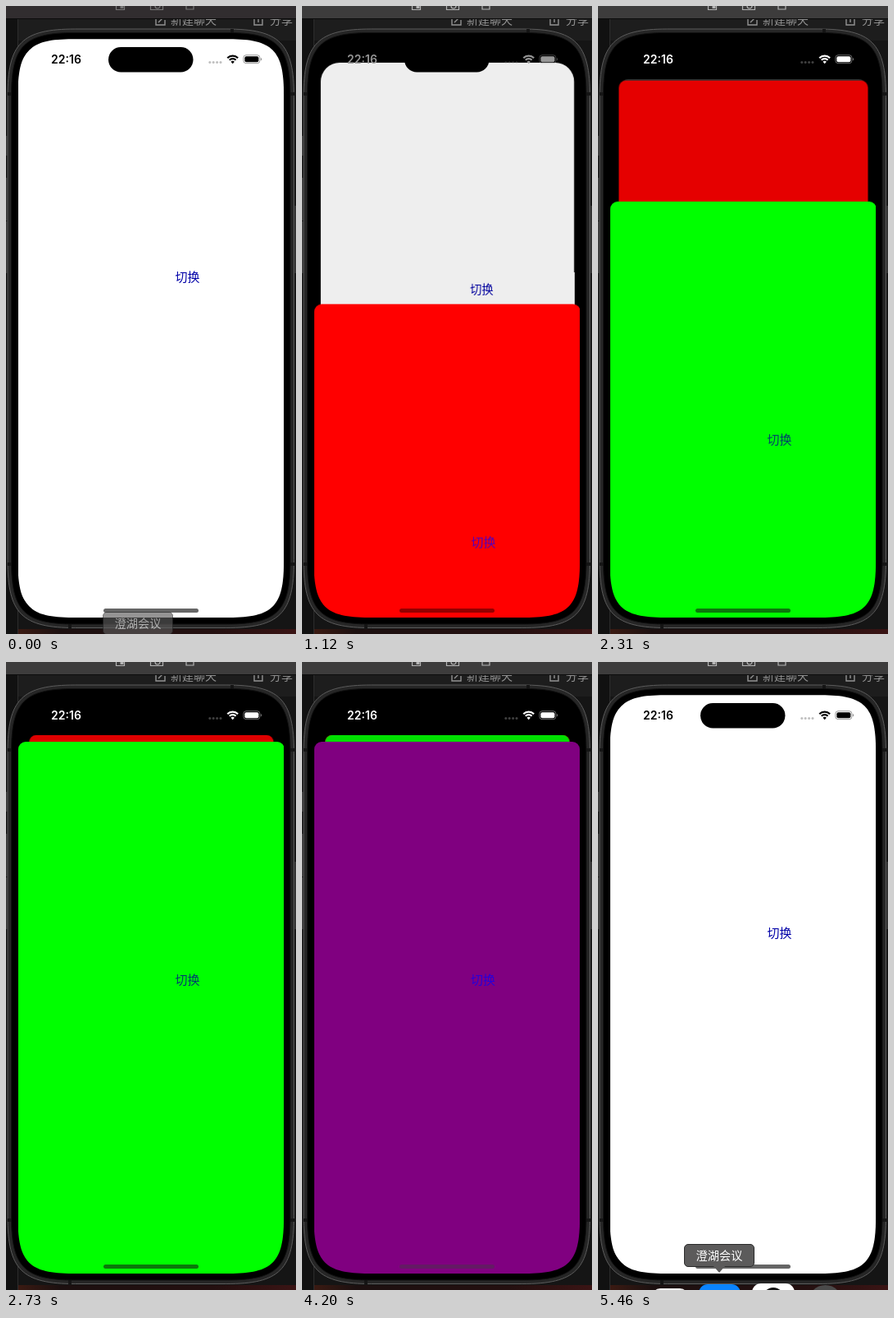
An HTML page that plays this animation: 354x764 px, repeating every 5.53 s.

```html
<!DOCTYPE html>
<html lang="zh-CN">
<head>
<meta charset="utf-8">
<title>Sheet stack</title>
<style>
:root { --loop: 5530ms; --sheet: cubic-bezier(.32, .72, 0, 1); }
html, body { margin: 0; width: 100%; height: 100%; overflow: hidden; background: #151515; }
body { font-family: "Noto Sans CJK SC", "Noto Sans CJK", sans-serif; }
#stage { position: relative; width: 354px; height: 764px; overflow: hidden; background: #151515; }
#stage > * { position: absolute; }
#stage > svg { left: 0; top: 0; }

/* window toolbar */
.bar { left: 0; top: 0; width: 354px; height: 16px; background: #312d2f; color: #777;
  border-bottom: 1px solid #0c0c0c; box-sizing: border-box; animation: focus var(--loop) step-end infinite; }
.bar svg { display: block; }
@keyframes focus {
  0% { background: #312d2f; color: #777; }
  16.456%, 100% { background: #3d3c3c; color: #b4b4b4; }
}

/* phone screen */
#screen { left: 14.5px; top: 40.3px; width: 324.6px; height: 703.7px; background: #000; }
.card { position: absolute; left: 0; top: 56.7px; width: 100%; height: 703.7px; border-radius: 9px;
  transform-origin: 50% 0; animation: var(--loop) var(--sheet) infinite; }
.card span { position: absolute; left: 156.5px; top: 279px; width: 100px; text-align: center;
  font-size: 15px; line-height: 20px; }
.base { top: 0; background: #fff; color: #0000a8; animation-name: base; }
.red { background: #f00; color: #5000c0; animation-name: red; }
.green { background: #0f0; color: #003c6e; animation-name: green; }
.purple { background: #800080; color: #2800d8; animation-name: purple; }
@keyframes base {
  0%, 18.626% { transform: none; border-radius: 46px; filter: brightness(1); opacity: 1; }
  27.667%, 39.512% { transform: translateY(49px) scale(.918); border-radius: 9px; filter: brightness(.89); opacity: 1; }
  48.553%, 76.4% { transform: translateY(49px) scale(.918); border-radius: 9px; filter: brightness(.89); opacity: 0; }
  76.401% { transform: translateY(49px) scale(.918); border-radius: 9px; filter: brightness(.89); opacity: 1; }
  85.443%, 100% { transform: none; border-radius: 46px; filter: brightness(1); opacity: 1; }
}
@keyframes red {
  0%, 18.626% { transform: translateY(648px) scale(1); filter: brightness(1); }
  27.667%, 39.512% { transform: translateY(0) scale(1); filter: brightness(1); }
  48.553%, 76.4% { transform: translateY(-8px) scale(.918); filter: brightness(.87); }
  76.401%, 100% { transform: translateY(648px) scale(1); filter: brightness(1); }
}
@keyframes green {
  0%, 39.512% { transform: translateY(648px) scale(1); filter: brightness(1); }
  48.553%, 57.016% { transform: translateY(0) scale(1); filter: brightness(1); }
  66.058%, 76.4% { transform: translateY(-8px) scale(.918); filter: brightness(.88); }
  76.401%, 100% { transform: translateY(648px) scale(1); filter: brightness(1); }
}
@keyframes purple {
  0%, 57.016% { transform: translateY(648px); }
  66.058%, 76.401% { transform: translateY(0); }
  85.443%, 100% { transform: translateY(648px); }
}
.status { animation: status var(--loop) var(--sheet) infinite; }
@keyframes status {
  0%, 18.626% { color: #000; }
  27.667%, 76.401% { color: #fff; }
  85.443%, 100% { color: #000; }
}
.home { left: 119px; top: 733px; width: 116px; height: 4.5px; border-radius: 3px;
  animation: home var(--loop) step-end infinite; }
@keyframes home {
  0% { background: #666; }
  18.85% { background: #940000; }
  39.75% { background: #0a780a; }
  57.25% { background: #641a64; }
  82.48%, 100% { background: #666; }
}

/* dock */
.dock { animation: dock var(--loop) linear infinite; }
@keyframes dock {
  0%, 91.139% { transform: translateY(12px); }
  94.937%, 96.2% { transform: translateY(4px); }
  97.468%, 98.734% { transform: none; }
  99.999%, 100% { transform: none; }
}
.tip { left: 105px; top: 708px; width: 86px; height: 28px; box-sizing: border-box; border: 1px solid #2a2a2a;
  border-radius: 5px; background: #5c5b5b; color: #fff; font-size: 14.2px; line-height: 24px; text-align: center;
  white-space: nowrap; animation: tip var(--loop) step-end infinite; }
.tip::after { content: ""; position: absolute; left: 35px; top: 26px; border: 7px solid transparent;
  border-top: 8px solid #5c5b5b; border-bottom: 0; }
@keyframes tip {
  0% { opacity: .65; transform: translate(13px, 29px); }
  1.266% { opacity: .3; transform: translate(13px, 31px); }
  2.532% { opacity: 0; transform: none; }
  97.468%, 100% { opacity: 1; transform: none; }
}
</style>
</head>
<body>
<div id="stage">
  <!-- desktop and phone body -->
  <svg width="354" height="764">
    <defs>
      <linearGradient id="wall">
        <stop offset="0" stop-color="#3a1a12"/><stop offset=".15" stop-color="#1c1010"/>
        <stop offset=".7" stop-color="#241010"/><stop offset="1" stop-color="#3a1414"/>
      </linearGradient>
    </defs>
    <rect x="15" y="16" width="339" height="26" fill="#1d1d1d"/>
    <rect width="14" height="764" fill="#111"/>
    <path d="M14.5 16V764" stroke="#2c2c2c"/>
    <rect x="15" y="758" width="339" height="6" fill="url(#wall)"/>
    <g fill="#929292" font-family="'Noto Sans CJK SC', 'Noto Sans CJK', sans-serif" font-weight="500" font-size="14">
      <text x="201" y="22">新建聊天</text>
      <text x="322" y="22">分享</text>
    </g>
    <g fill="none" stroke="#929292" stroke-width="1.4">
      <path d="M188 11h-5v12h11v-6M186 20l9-9M303 12v11h10v-11M308 20v-9"/>
    </g>
    <path d="M.5 158v24M.5 209v52M.5 262v63M353.5 243v82" stroke="#3a3a3a" stroke-width="2"/>
    <path id="shell" fill="#262626" stroke="#5c5c5c"/>
    <path d="M2 107h5M2 679h5M347 107h5M347 679h5M78 752v5M276 28v5" stroke="#151515" stroke-width="4"/>
    <path id="bezel" fill="#000" stroke="#111"/>
  </svg>

  <div class="bar">
    <svg width="354" height="15" fill="none" stroke="currentColor" stroke-width="1.2">
      <path d="M134.5-1V4.5H144.5V-1M176.500-1V4.500H191.500V-1M220-1V4H229V-1"/>
      <path d="M139.500 0h4v3h-4z" fill="currentColor" stroke="none"/>
      <circle cx="185" cy="0" r="3"/>
    </svg>
  </div>

  <div id="screen">
    <div class="card base"><span>切换</span></div>
    <div class="card red"><span>切换</span></div>
    <div class="card green"><span>切换</span></div>
    <div class="card purple"><span>切换</span></div>
  </div>

  <svg class="status" width="354" height="100" fill="currentColor">
    <rect x="125" y="50" width="103.500" height="30.500" rx="15.250" fill="#000"/>
    <text x="73.500" y="70" text-anchor="middle" font-family="Inter, sans-serif" font-weight="600" font-size="14">22:16</text>
    <g opacity=".25">
      <circle cx="248.800" cy="68.500" r="1.500"/><circle cx="253.200" cy="68.500" r="1.500"/>
      <circle cx="257.600" cy="68.500" r="1.500"/><circle cx="262" cy="68.500" r="1.500"/>
    </g>
    <g fill="none" stroke="currentColor" stroke-width="2.200">
      <path d="M270.300 63.200a9 9 0 0 1 12.800 0M272.800 65.800a5.500 5.500 0 0 1 7.800 0"/>
    </g>
    <path d="M276.700 70.200l-2.200-2.400a3.200 3.200 0 0 1 4.400 0z"/>
    <rect x="289.900" y="59.700" width="20" height="10" rx="3.200" fill="none" stroke="currentColor" opacity=".4"/>
    <rect x="291.400" y="61.200" width="17" height="7" rx="2"/>
    <path d="M311 63v3.400q1.200-.5 1.200-1.700t-1.200-1.700z" opacity=".45"/>
  </svg>

  <div class="home"></div>

  <svg width="354" height="764">
    <g class="dock">
      <rect x="66" y="762" width="44" height="44" rx="10" fill="#eee"/>
      <rect x="123" y="757" width="51" height="51" rx="11" fill="#0a84ff"/>
      <rect x="188" y="756" width="52" height="52" rx="11" fill="#fff"/>
      <circle cx="214" cy="774" r="13" fill="#111"/>
      <circle cx="277.500" cy="779" r="21" fill="#4a4a4a"/>
    </g>
  </svg>
  <div class="tip">澄湖会议</div>
</div>
<script>
// Rounded rectangle with continuous-curvature corners
function squircle(x, y, w, h, r) {
  const a = 1.45 * r, b = .3 * r, X = x + w, Y = y + h;
  return `M${x} ${y + a}C${x} ${y + b} ${x + b} ${y} ${x + a} ${y}H${X - a}` +
    `C${X - b} ${y} ${X} ${y + b} ${X} ${y + a}V${Y - a}` +
    `C${X} ${Y - b} ${X - b} ${Y} ${X - a} ${Y}H${x + a}` +
    `C${x + b} ${Y} ${x} ${Y - b} ${x} ${Y - a}Z`;
}
const el = id => document.getElementById(id);
el('shell').setAttribute('d', squircle(2, 28, 349.5, 728.5, 57));
el('bezel').setAttribute('d', squircle(6.5, 32.5, 340.5, 719.5, 53));
el('screen').style.clipPath = `path('${squircle(0, 0, 324.6, 703.7, 46)}')`;
</script>
</body>
</html>
```
